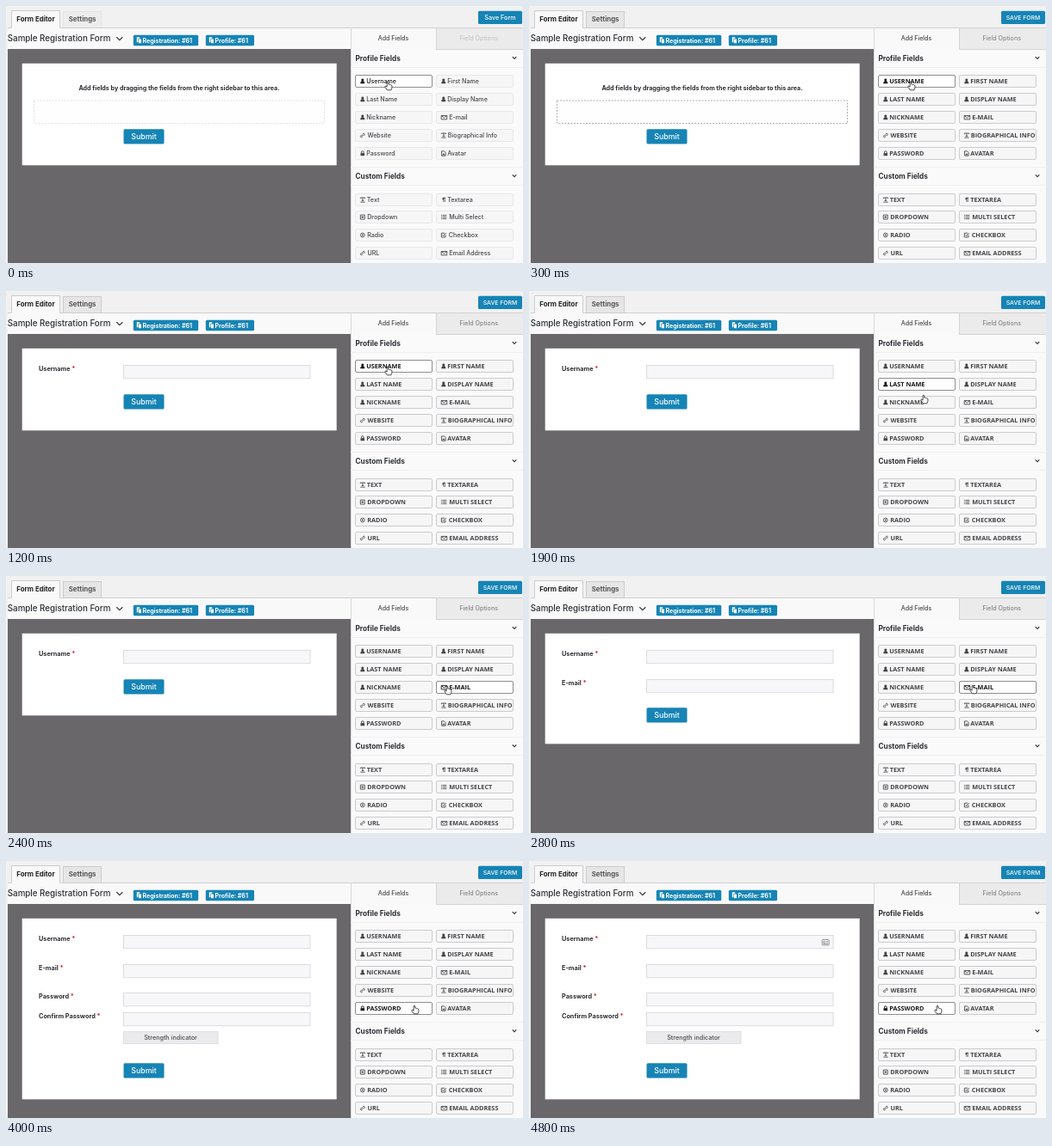
An HTML page for the animation above (5 s loop, 600 by 299 pixels).

```html
<!DOCTYPE html>
<html lang="en">
<head>
<meta charset="utf-8">
<title>Form editor</title>
<style>
  html, body { margin: 0; width: 100%; height: 100%; overflow: hidden; background: #f1f1f1; }
  svg { display: block; width: 100vw; height: 100vh; }
  text { font-family: Inter, sans-serif; font-weight: 500; white-space: pre; }
  .bold { font-weight: 700; }
  .caps { font-family: "Open Sans", sans-serif; font-weight: 700; }
  .mid { text-anchor: middle; }
</style>
</head>
<body>
<svg id="stage" viewBox="0 0 600 299" preserveAspectRatio="none"></svg>
<script>
const STEP = 100, LOOP = 5000;
const BLUE = '#1684b5', INK = '#2b2d31', GREY = '#454548';

const rect = (x, y, w, h, fill, stroke = 'none', r = 0, extra = '') =>
  `<rect x="${x}" y="${y}" width="${w}" height="${h}" rx="${r}" fill="${fill}" stroke="${stroke}" ${extra}/>`;
const text = (x, y, size, str, fill = INK, cls = '') =>
  `<text x="${x}" y="${y}" font-size="${size}" fill="${fill}" class="${cls}">${str}</text>`;
const line = (d, stroke, width = 1, extra = '') =>
  `<path d="${d}" fill="none" stroke="${stroke}" stroke-width="${width}" ${extra}/>`;
const chevron = (x, y, s) => line(`M${x - s} ${y - s / 2}l${s} ${s} ${s} ${-s}`, '#3a3a3c', 1.2);

// Icons are centred on 0,0: [filled path, stroked path, extra room before the label]
const icons = {
  user: ['M0-3.4a1.7 1.7 0 0 1 1 3.1Q3 .2 3 3H-3Q-3 .2-1-.3A1.7 1.7 0 0 1 0-3.4', '', 0],
  mail: ['', 'M-3-2.3h7.5v5h-7.5zl3.7 2.9L4.5-2.3', 2],
  link: ['', 'M-1 1l2-2M-.3-1.2l1-1a1.2 1.2 0 0 1 1.7 1.7l-1 1M.3 1.2l-1 1a1.2 1.2 0 0 1-1.7-1.7l1-1', 1.2],
  lock: ['M-2.6-.4h5.2v3.5h-5.2z', 'M-1.5-.4v-1.3a1.5 1.5 0 0 1 3 0v1.3', 0],
  width: ['', 'M-2.8-1.6v-1.2h6v1.2M.2-2.8v4M-1.2 1h2.8M-2.8 3h6', 0.6],
  image: ['M-1.7 2l1.2-2 .8.9.7-.8.8 1.9z', 'M-2.5-3h3.3l1.8 1.8v4.3h-5.1z', 0],
  para: ['M-.4-3h2.9v.9h-.5v5h-.8v-5H.5v5h-.8V.3a1.7 1.7 0 0 1-.1-3.3', '', 0],
  plus: ['', 'M-2.8-2.7h5.6v5.6h-5.6zM-1.5.1h3M0-1.4v3', 1],
  list: ['M-3.3-2.8h1v1h-1zM-3.3-.5h1v1h-1zM-3.3 1.8h1v1h-1z', 'M-1.5-2.3h5.5M-1.5 0h5.5M-1.5 2.3h5.5', 2],
  dot: ['M0-1a1 1 0 0 1 0 2a1 1 0 0 1 0-2', 'M0-2.7a2.7 2.7 0 0 1 0 5.4a2.7 2.7 0 0 1 0-5.4', 1],
  check: ['', 'M2.5 0v2.8h-5.3v-5.4h4.3M-1.4-.5L0 1l3.3-3.7', 1.5],
};
const icon = (name, x, y, color) => {
  const [solid, stroke] = icons[name];
  return `<g transform="translate(${x} ${y}) scale(.88)"><path d="${solid}" fill="${color}"/>${line(stroke, color)}</g>`;
};

const group = (rows, top) => rows.map(([name, label], i) =>
  ({ name, label, x: i % 2 ? 499.5 : 405.5, y: Math.round(top + (i >> 1) * 20.85) + .5 }));
const fields = [
  ...group([['user', 'Username'], ['user', 'First Name'], ['user', 'Last Name'], ['user', 'Display Name'],
    ['user', 'Nickname'], ['mail', 'E-mail'], ['link', 'Website'], ['width', 'Biographical Info'],
    ['lock', 'Password'], ['image', 'Avatar']], 80.3),
  ...group([['width', 'Text'], ['para', 'Textarea'], ['plus', 'Dropdown'], ['list', 'Multi Select'],
    ['dot', 'Radio'], ['check', 'Checkbox'], ['link', 'URL'], ['mail', 'Email Address']], 217.6),
];
const fieldAt = ([x, y]) => fields.find(f => x >= f.x && x <= f.x + 89 && y >= f.y && y <= f.y + 14.5);

// Pointer tip, one point per step once a move begins
const moves = [
  [16, [[443, 88], [444, 93], [450, 106], [458, 121], [469, 129], [484, 132], [499, 131], [506, 129], [512, 128], [515, 127]]],
  [31, [[515, 127], [511, 132], [494, 149], [485, 160], [480, 165], [476, 167], [474, 168]]],
];
function pointer(tick) {
  const [start, path] = moves[tick < moves[1][0] ? 0 : 1];
  return path[Math.min(Math.max(tick - start, 0), path.length - 1)];
}

function drawPointer([x, y], hand) {
  const d = hand
    ? 'M-.9.7Q0-.5.8.7V3.2Q1.8 2.6 2.4 3.5 3.3 3 3.8 4 4.9 3.7 4.9 5V7.2L3.9 9.8H-.6L-3.2 6.2Q-3.3 4.9-2 5.2L-.9 6.2z'
    : 'M0 0V8.3L1.9 6.6 3.2 9.5 4.6 8.9 3.3 6.1H5.9z';
  return `<path transform="translate(${x} ${y})" d="${d}" fill="${hand ? '#fff' : '#111'}" stroke="${hand ? '#222' : '#fff'}" stroke-width=".8"/>`;
}

function drawField(f, active, pressed, caps, fade) {
  const color = active ? '#18191b' : GREY;
  const fill = pressed ? '#e9e9ea' : active ? '#fefefe' : '#f6f6f7';
  const label = caps ? f.label.toUpperCase() : f.label;
  const [size, cls] = caps ? [7.3, 'caps'] : [7.1, ''];
  return rect(f.x, f.y, 89, 14, fill, active ? '#8d8e91' : '#cbcbcd', 1.5, `stroke-opacity="${active ? 1 : fade}"`) +
    icon(f.name, f.x + 8.3, f.y + 7, color) +
    text(f.x + 12.7 + icons[f.name][2], f.y + 9.7, size, label, color, cls);
}

const badge = (x, w, label) => rect(x, 33.8, w, 12.4, BLUE, 'none', 1.5) +
  `<path fill="#fff" d="M${x + 4} 36.3h3.4v1.5h-1.8v4.4H${x + 4}zM${x + 6.2} 38.4h2.9v4.8h-2.9z"/>` +
  text(x + 10.7, 42.6, 7, label, '#fff', 'bold');

function drawHeader(caps, fade) {
  return rect(0, 0, 600, 299, '#f1f1f1') +
    rect(2, 25, 598, 274, '#f9f9fa') +
    rect(2, 50, 398, 249, '#69676a') +
    line('M2 25.5H600', '#cfcfd1') +
    rect(66.5, 6.5, 44, 19, '#e6e6e7', '#cdcdcf', 0, `opacity="${fade}"`) +
    rect(6.5, 5.5, 56, 21, '#f9f9fa') + line('M6.5 25.5v-20h56v20', '#cdcdcf') +
    text(12.3, 18.4, 7.9, 'Form Editor', '#222', 'bold') +
    text(72.7, 18.4, 7.85, 'Settings', '#555', 'bold') +
    rect(548, 5.7, 51, 15.3, BLUE, 'none', 1.5) +
    text(573.5, 16, caps ? 6.85 : 7.2, caps ? 'SAVE FORM' : 'Save Form', '#fff', 'mid') +
    text(1.8, 41.3, 9.75, 'Sample Registration Form') + chevron(131.8, 38, 3.5) +
    badge(147.8, 75.4, 'Registration: #61') + badge(231.8, 56.2, 'Profile: #61');
}

function drawSidebar(tick, caps, fade, pressed) {
  const active = fieldAt(pointer(tick - 1));
  return rect(400, 50, 200, 249, '#fafafb') +
    rect(499.5, 25.5, 101, 25, '#ebebec', '#d3d3d5') + line('M400.5 25V299', '#d9d9db') +
    text(449.5, 40.3, 7.05, 'Add Fields', '#444', 'mid') +
    `<g opacity="${fade}">${text(548.7, 40.3, 7.1, 'Field Options', '#858588', 'mid')}</g>` +
    text(405.5, 64, 8.25, 'Profile Fields', INK, 'bold') + chevron(590, 60.3, 2.3) +
    text(405.5, 201.2, 8.25, 'Custom Fields', INK, 'bold') + chevron(590, 197.5, 2.3) +
    line('M400 71.5H600M400 187.5H600M400 208.5H600', '#f0f0f1') +
    fields.map(f => drawField(f, f === active, f === active && pressed, caps, fade)).join('');
}

const inputs = [['Username', 86.5], ['E-mail', 120.5], ['Password', 153.5], ['Confirm Password', 176.5]];
const drawInput = ([label, y]) =>
  text(38, y + 6.8, 7.3, `${label} <tspan fill="#d8232f">*</tspan>`, INK, 'bold') +
  rect(136.5, y, 216.5, 15.2, '#f7f7f9', '#dcdce0');

function drawForm(count, fade, card) {
  const bottom = { 0: 185, 1: 162, 2: 195, 4: 277 }[count];
  let out = rect(18.7, 66.8, 365, bottom - 66.5, '#fff');
  if (count === 0) {
    out += text(201, 97.6, 7.15, 'Add fields by dragging the fields from the right sidebar to this area.', INK, 'bold mid') +
      rect(32.5, 110, 337, 26.5, '#fefefe', '#a9a9ad', 0, `stroke-dasharray="2 1.5" opacity="${fade}"`);
  }
  out += inputs.slice(0, count).map(drawInput).join('');
  if (count === 4) {
    out += rect(136.5, 198.5, 109.5, 14, '#ebebed', '#dfdfe2') +
      text(191, 208.2, 7.2, 'Strength indicator', '#4a4a4d', 'mid');
  }
  if (card) {
    out += rect(340.2, 91.5, 8, 6.4, '#fff', '#88888c', .6, 'stroke-width=".9"') +
      line('M341.6 93.4h2v2h-2zM344.8 93.5h2.4M344.8 95h2.4M341.5 96.6h5.7', '#88888c', .8);
  }
  const y = bottom - 42;
  return out + rect(136.5, y + .3, 47, 17.2, BLUE, 'none', 1.5) +
    text(160, y + 12, 8.8, 'Submit', '#fff', 'mid');
}

function scene(tick) {
  const caps = tick >= 1;
  const fade = Math.min(1, .35 + tick * .2);
  const count = tick < 12 ? 0 : tick < 28 ? 1 : tick < 40 ? 2 : 4;
  const pressed = tick === 10 || tick === 11 || tick === 27 || tick === 39;
  const tip = pointer(tick);
  const between = tip[1] > 158 && tip[1] < 163.5;
  return drawHeader(caps, fade) + drawForm(count, fade, tick >= 48) +
    drawSidebar(tick, caps, fade, pressed) + drawPointer(tip, !between);
}

const stage = document.getElementById('stage');
let shown = -1;
function frame() {
  const tick = Math.floor(performance.now() % LOOP / STEP);
  if (tick !== shown) stage.innerHTML = scene(shown = tick);
  requestAnimationFrame(frame);
}
frame();
</script>
</body>
</html>
```
